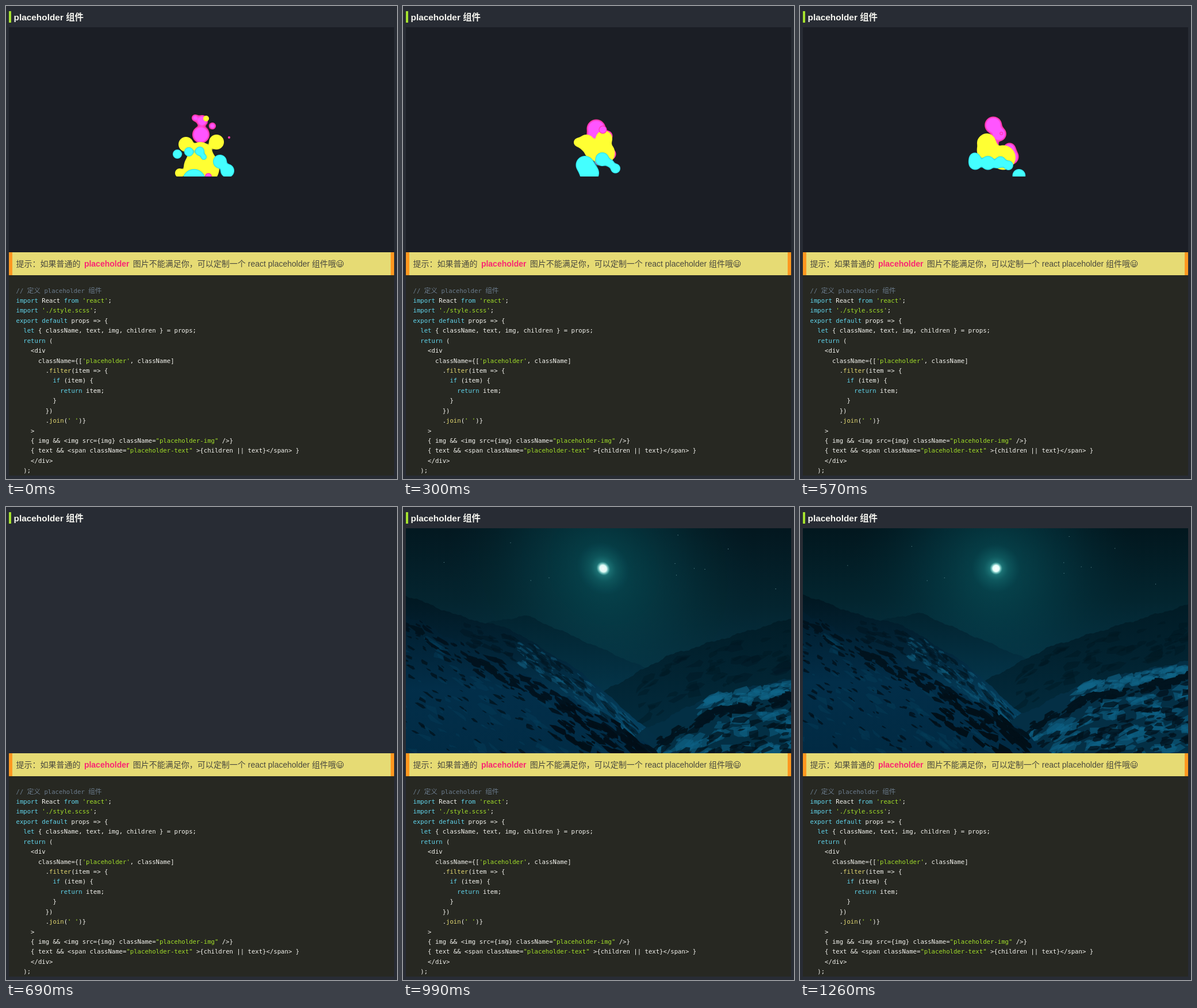
An HTML page with a canvas for the animation above (1.69 s loop, 680x824 px).

```html
<!DOCTYPE html>
<html lang="zh-CN">
<head>
<meta charset="utf-8">
<title>placeholder 组件</title>
<style>
html, body { margin: 0; width: 100%; height: 100%; overflow: hidden; background: #282c34; }
body { position: relative; font-family: "Liberation Sans", "Noto Sans CJK SC", "Noto Sans CJK", sans-serif; }
h1, canvas, p, pre { position: absolute; left: 5px; margin: 0; box-sizing: border-box; white-space: pre; }
h1 { top: 9px; height: 20px; padding-left: 4.5px; border-left: 4px solid #a6e22e; font-size: 15.4px; line-height: 21px; color: #f8f8f2; }
canvas { top: 37px; }
p { top: 429px; width: 670px; height: 40px; padding-left: 6.5px; border: solid #fd971f; border-width: 0 6px; background: #e6db74; color: #49483e; font: 14px/41px "Liberation Sans", "Noto Sans CJK JP", "Noto Sans CJK", sans-serif; }
p b { margin: 0 2.5px; color: #f92672; }
p svg { vertical-align: -2px; fill: none; stroke: #49483e; }
pre { top: 469px; width: 670px; height: 349px; padding: 18.6px 12.5px 0; overflow: hidden; background: #272822; color: #f8f8f2; font: 10.63px/17.42px "DejaVu Sans Mono", "Noto Sans CJK SC", monospace; text-shadow: 0 1px rgba(0, 0, 0, .3); }
pre i { font-style: normal; color: #708090; }
pre i span { font-size: 11.66px; line-height: 0; }
pre b { font-weight: 400; color: #66d9ef; }
pre q { quotes: none; color: #a6e22e; }
pre u { text-decoration: none; color: #e6db74; }
</style>
</head>
<body>
<h1>placeholder 组件</h1>
<canvas width="670" height="392"></canvas>
<p>提示：如果普通的 <b>placeholder</b> 图片不能满足你，可以定制一个 react placeholder 组件哦<svg width="14" height="14"><circle cx="7" cy="7" r="5.8"/><path d="M3.6 4 6 5.3 3.6 6.5M10.4 4 8 5.3l2.4 1.2M3.8 8.3h6.4a3.2 3 0 0 1-6.4 0z"/></svg></p>
<pre><i>// <span>定义</span> placeholder <span>组件</span></i>
<b>import</b> React <b>from</b> <q>'react'</q>;
<b>import</b> <q>'./style.scss'</q>;
<b>export</b> <b>default</b> props =&gt; {
  <b>let</b> { className, text, img, children } = props;
  <b>return</b> (
    &lt;div
      className={[<q>'placeholder'</q>, className]
        .<u>filter</u>(item =&gt; {
          <b>if</b> (item) {
            <b>return</b> item;
          }
        })
        .<u>join</u>(<q>' '</q>)}
    &gt;
    { img &amp;&amp; &lt;img src={img} className=<q>"placeholder-img"</q> /&gt;}
    { text &amp;&amp; &lt;span className=<q>"placeholder-text"</q> &gt;{children || text}&lt;/span&gt; }
    &lt;/div&gt;
  );</pre>
<script>
const ctx = document.querySelector('canvas').getContext('2d');
ctx.translate(-5, -37);
const LOOP = 1690;
const lerp = (a, b, k) => a + (b - a) * k;
const triples = text => text.split(', ').map(s => s.split(' ').map(Number));

// Each liquid is a soft union of a few circles "x y r": pink, yellow, pink on top, cyan.
const liquids = [
  { fill: [255, 85, 255], edge: [255, 47, 150], rim: 3.5 },
  { fill: [255, 255, 51], edge: [244, 238, 44], rim: 1 },
  { fill: [255, 85, 255], edge: [255, 47, 150], rim: 2 },
  { fill: [68, 255, 255], edge: [34, 207, 224], rim: 1.5 }
];
const poses = [
  ['329 195 6, 341 200 10, 359 209 6, 339 224 15, 388 229 2',
   '313 241 13, 366 237 13, 338 258 21, 340 282 31, 302 291 8, 348 196 5',
   '352 297 6',
   '298 258 8, 318 254 8, 337 253 8, 344 263 5, 372 271 12, 385 287 12, 327 304 20'],
  ['331 212 12, 310 220 7, 342 177 5, 337 228 6, 376 290 6',
   '363 208 10, 351 230 14, 322 253 17, 345 268 23, 304 282 15, 314 210 8, 366 275 9',
   '346 259 13',
   '325 284 21, 352 295 20, 373 247 9, 380 261 9, 383 284 11'],
  ['341 216 21, 349 238 15, 368 276 14, 384 288 14, 306 249 10',
   '336 255 19, 345 282 27, 316 224 12, 318 234 10, 368 226 5, 295 265 7',
   '349 172 1',
   '308 270 11, 296 287 14, 320 287 15, 340 287 5, 356 282 6, 378 301 11, 363 250 3']
].map(pose => pose.map(triples));

// Pair circles by index; one without a partner shrinks away in place.
function blend(a, b, k) {
  const gone = c => [c[0], c[1], -8];
  return Array.from({ length: Math.max(a.length, b.length) }, (_, i) => {
    const p = a[i] || gone(b[i]), q = b[i] || gone(a[i]);
    return p.map((v, j) => lerp(v, q[j], k));
  });
}

function softUnion(circles, x, y) {
  const soft = 6;
  return circles.reduce((d, [cx, cy, r]) => {
    const e = Math.hypot(x - cx, y - cy) - r, h = Math.max(soft - Math.abs(d - e), 0);
    return Math.min(d, e) - h * h / soft / 4;
  }, 99);
}

function blobs(from, to, k) {
  ctx.fillStyle = '#1b1e25';
  ctx.fillRect(5, 37, 670, 392);
  const x0 = 275, y0 = 165, w = 130, h = 132;
  const image = ctx.getImageData(x0 - 5, y0 - 37, w, h), px = image.data;
  liquids.forEach(({ fill, edge, rim }, i) => {
    const circles = blend(poses[from][i], poses[to][i], k);
    for (let n = 0; n < w * h; n++) {
      const d = softUnion(circles, x0 + n % w + .5, y0 + Math.floor(n / w) + .5);
      if (d > .5) continue;
      const cover = Math.min(1, .5 - d), inner = Math.min(1, Math.max(0, -d / rim));
      for (let c = 0; c < 3; c++) px[n * 4 + c] = lerp(px[n * 4 + c], lerp(edge[c], fill[c], inner), cover);
    }
  });
  ctx.putImageData(image, x0 - 5, y0 - 37);
}

let seed;
const rnd = () => (seed = seed * 16807 % 2147483647) / 2147483647;

function gradient(g, ...colors) {
  colors.forEach((c, i) => g.addColorStop(i / (colors.length - 1), c));
  return g;
}
const down = (y0, y1, ...colors) => gradient(ctx.createLinearGradient(0, y0, 0, y1), ...colors);

// A skyline through a few key points, roughened by sines.
function ridge(text, rough) {
  const keys = triples(text);
  const height = x => {
    const i = Math.max(1, keys.findIndex(p => p[0] >= x)), [a, b] = [keys[i - 1], keys[i]];
    return lerp(a[1], b[1], (x - a[0]) / (b[0] - a[0])) +
      rough * (Math.sin(x * .11) + Math.sin(x * .27 + 2) * .6 + Math.sin(x * .73) * .35);
  };
  return { height, left: keys[0][0], right: keys[keys.length - 1][0] };
}

function land({ height, left, right }, fill) {
  ctx.beginPath();
  ctx.moveTo(left, 700);
  for (let x = left; x <= right; x += 2) ctx.lineTo(x, height(x));
  ctx.lineTo(right, 700);
  ctx.fillStyle = fill;
  ctx.fill();
}

// Ragged flakes strewn below a skyline, leaning with its slope.
function flakes({ height }, x0, x1, top, depth, count, size, color) {
  ctx.fillStyle = color;
  for (let i = 0; i < count; i++) {
    const x = lerp(x0, x1, rnd()), y = height(x) + top + depth * rnd(), r = size * (.3 + rnd());
    const slope = (height(x + 30) - height(x - 30)) / 60;
    ctx.beginPath();
    for (let a = 0; a < 6; a++) {
      const q = r * (.4 + rnd()), dx = q * 1.6 * Math.cos(a * 1.05);
      ctx.lineTo(x + dx, y + q * .7 * Math.sin(a * 1.05) + dx * slope);
    }
    ctx.fill();
  }
}

// Night valley, drawn past its frame so that the skewed poses stay filled.
function photo(alpha, matrix) {
  seed = 7;
  const glow = (r, ...colors) => {
    ctx.fillStyle = gradient(ctx.createRadialGradient(341, 107, 0, 341, 107, r), ...colors);
    ctx.fillRect(341 - r, 107 - r, 2 * r, 2 * r);
  };
  ctx.beginPath();
  ctx.rect(5, 37, 670, 392);
  ctx.clip();
  ctx.globalAlpha = alpha;
  ctx.translate(340, 233);
  ctx.transform(...matrix);
  ctx.translate(-340, -233);
  ctx.fillStyle = down(37, 290, '#02171e', '#03252f', '#05364a');
  ctx.fillRect(-400, -200, 1500, 900);
  glow(250, 'rgba(10,96,104,.65)', 'rgba(5,66,78,.4)', 'rgba(3,40,50,0)');
  glow(42, 'rgba(70,185,180,.75)', 'rgba(30,130,130,.3)', 'rgba(16,112,116,0)');
  glow(11, '#fff', '#e6fffa', 'rgba(120,225,215,0)');
  ctx.fillStyle = 'rgba(150,200,205,.7)';
  for (let i = 0; i < 12; i++) ctx.fillRect(rnd() * 670, 45 + rnd() * 110, 1, 1);

  const far = ridge('60 214, 208 184, 392 264, 500 300', 1);
  const right = ridge('320 304, 430 245, 525 215, 675 170, 1000 70', 1.2);
  const left = ridge('-300 60, 5 152, 105 189, 180 206, 290 274, 378 355, 450 420', 1.2);
  const front = ridge('-300 90, 5 182, 80 222, 200 280, 350 362, 440 432, 600 560', 2.5);
  const cliff = ridge('365 372, 490 308, 560 292, 675 268, 1000 220', 1.5);

  land(far, down(184, 310, '#02232f', '#04354a'));
  land(right, down(170, 360, '#011b25', '#022a3c'));
  flakes(right, 380, 760, 10, 70, 90, 9, 'rgba(1,20,30,.35)');
  land(left, down(150, 350, '#01161f', '#022539', '#05405f'));
  flakes(left, 190, 385, 5, 45, 130, 4, 'rgba(16,92,124,.5)');
  flakes(left, 100, 370, 8, 40, 90, 6, 'rgba(1,22,34,.6)');

  land(cliff, '#042f45');
  flakes(cliff, 470, 760, 4, 18, 90, 8, 'rgba(16,100,135,.6)');
  flakes(cliff, 400, 760, 24, 12, 90, 8, '#01141f');
  flakes(cliff, 400, 760, 40, 110, 170, 10, 'rgba(14,98,134,.55)');
  flakes(cliff, 370, 760, 35, 120, 150, 8, 'rgba(1,18,28,.75)');

  land(front, down(180, 430, '#011c2b', '#022e49', '#012a43'));
  flakes(front, -200, 400, 25, 210, 200, 7, 'rgba(5,62,90,.4)');
  flakes(front, -200, 400, 20, 190, 260, 4, 'rgba(1,15,24,.75)');
  flakes(front, 10, 400, 0, 35, 150, 6, '#01131e');
  flakes(front, 240, 400, 0, 70, 70, 8, '#010f18');
}

const rest = [1, 0, 0, 1, 0, 0], swing = [1.07, .02, .11, 1.094, 21, 12];
const steps = [
  [0, () => blobs(0, 0, 0)],
  [150, () => blobs(1, 1, 0)],
  [300, () => blobs(1, 2, .5)],
  [420, () => blobs(2, 2, 0)],
  [570, () => blobs(2, 0, .4)],
  [690, () => {}],
  [840, () => photo(.82, [1.148, .079, .528, .882, 92, -39])],
  [990, () => photo(.96, swing)],
  [1110, () => photo(1, swing.map((v, i) => lerp(v, rest[i], .6)))],
  [1260, () => photo(1, rest)]
];

let shown;
function tick() {
  const t = performance.now() % LOOP;
  const step = steps.filter(s => s[0] <= t).pop();
  if (step !== shown) {
    shown = step;
    ctx.clearRect(5, 37, 670, 392);
    ctx.save();
    step[1]();
    ctx.restore();
  }
  requestAnimationFrame(tick);
}
tick();
</script>
</body>
</html>
```
